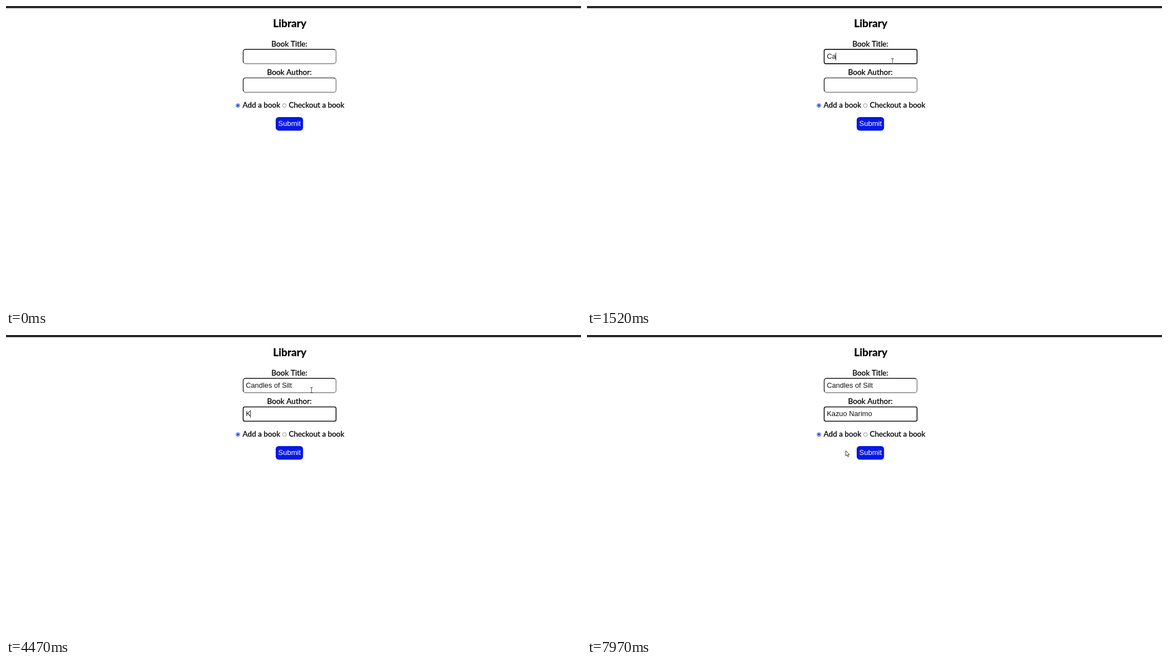
Recreate the animation shown at these times as an HTML page with a canvas. Size 1034 by 542 pixels, loop 8 s.

```html
<!DOCTYPE html>
<html lang="en">
<head>
<meta charset="utf-8">
<title>Library</title>
<style>
html, body { margin: 0; width: 100%; height: 100%; overflow: hidden; background: #fff; }
canvas { display: block; }
</style>
</head>
<body>
<canvas id="stage" width="1034" height="542"></canvas>
<script>
const ctx = document.getElementById('stage').getContext('2d');
const LOOP = 8000;
const CENTER = 509.8;
const HAND = 'Lato, sans-serif';
const SANS = '"Liberation Sans", Arial, sans-serif';
const MENU = '"Noto Sans", "Open Sans", sans-serif';

const FIELD = { x: 426.5, w: 167, h: 25.8 };
const TITLE_Y = 78.1, AUTHOR_Y = 129.5;
const TITLE = 'Candles of Silt', AUTHOR = 'Kazuo Narimo';

// [time, number of characters visible from then on]
const TITLE_KEYS = [[1370, 1], [1500, 2], [1630, 3], [1760, 4], [1890, 6], [2020, 7], [2150, 8],
  [2400, 9], [2700, 10], [2780, 11], [3310, 12], [3460, 13], [3610, 14], [3760, 15]];
const AUTHOR_KEYS = [[4470, 1], [5000, 2], [5230, 3], [5410, 4], [5590, 5], [5770, 6], [5950, 7],
  [6420, 8], [6570, 9], [6720, 10], [6890, 11], [7120, 12]];

const TITLE_HINTS = [
  'New to wool',
  '1990-1993 VOKRA TELIO OEM TOMBSTONE DASH BEZEL AC VENTS POP UP',
  '1995 WVQ N6 Sedan Rear Subframe Crossmember',
  'RADIATOR CORE SUPPORT FRONT CROSS MEMBER 52047916385 WVQ U52',
  '1990-1997 VOKRA TELIO REAR LOWER CONTROL ARM DRIVER LEFT LH NEW',
  'OEM WVQ U52 7-Format 1992-1999 Radiator Support Front Panel Used 52047'
];
const AUTHOR_HINTS = ['Kelbo Tarn', 'Kass Orvine'];

const within = (t, a, b) => t >= a && t < b;

function typed(text, keys, t) {
  let n = 0;
  for (const [time, count] of keys) if (t >= time) n = count;
  return text.slice(0, n);
}

function label(text, x, y, font, color = '#000', align = 'center') {
  ctx.font = font;
  ctx.fillStyle = color;
  ctx.textAlign = align;
  ctx.fillText(text, x, y);
}

// Label with a thin outline, for the sturdy pen-like weight.
function penLabel(text, x, y, font, align = 'center') {
  label(text, x, y, font, '#000', align);
  ctx.strokeStyle = '#000';
  ctx.lineWidth = 0.3;
  ctx.strokeText(text, x, y);
}

function rounded(x, y, w, h, r) {
  ctx.beginPath();
  ctx.roundRect(x, y, w, h, r);
}

function stroke(color, width) {
  ctx.strokeStyle = color;
  ctx.lineWidth = width;
  ctx.stroke();
}

function field(y, text, focused, caret) {
  const { x, w, h } = FIELD, r = 4.2;
  rounded(x, y, w, h, focused ? 3 : r);
  ctx.fillStyle = '#fff';
  ctx.fill();
  if (focused) {
    stroke('#101010', 1.6);
  } else {
    stroke('#6a6a6a', 1.2);
    ctx.beginPath();
    ctx.moveTo(x + 1, y + h - 2);
    ctx.lineTo(x, y + h - r);
    ctx.arcTo(x, y, x + r, y, r);
    ctx.lineTo(x + w - r, y);
    ctx.lineTo(x + w - 2, y + 1);
    stroke('#151515', 1.2);
  }
  label(text, 431.2, y + 16.9, `12.85px ${SANS}`, '#111', 'left');
  if (caret) {
    const cx = Math.floor(431.2 + ctx.measureText(text).width);
    ctx.fillStyle = '#333';
    ctx.fillRect(cx, Math.round(y + 5.4), 1, 14);
  }
}

function radio(x, checked) {
  const ring = checked ? '#1746e0' : '#858585';
  ctx.beginPath();
  ctx.arc(x, 179.2, 3.4, 0, Math.PI * 2);
  stroke(ring, 0.9);
  if (!checked) return;
  ctx.beginPath();
  ctx.arc(x, 179.2, 2.1, 0, Math.PI * 2);
  ctx.fillStyle = ring;
  ctx.fill();
}

function dropdown(y, w, hints) {
  const x = 425.3, row = 21.1;
  ctx.save();
  ctx.shadowColor = 'rgba(0,0,0,.38)';
  ctx.shadowBlur = 3;
  ctx.shadowOffsetY = 1;
  rounded(x, y, w, hints.length * row + 9, 2);
  ctx.fillStyle = '#fff';
  ctx.fill();
  ctx.restore();
  ctx.save();
  ctx.beginPath();
  ctx.rect(x, y, w - 6.8, 200);
  ctx.clip();
  hints.forEach((hint, i) =>
    label(hint, 432, y + 17.7 + i * row, `600 7.25px ${MENU}`, '#1c1c1c', 'left'));
  ctx.restore();
}

function ibeam(x, y) {
  const half = 4.5, serif = 2.5;
  ctx.beginPath();
  for (const end of [y - half, y + half]) {
    ctx.moveTo(x - serif, end);
    ctx.lineTo(x + serif, end);
  }
  ctx.moveTo(x, y - half);
  ctx.lineTo(x, y + half);
  stroke('#444', 0.9);
}

function arrow(x, y) {
  ctx.beginPath();
  ctx.moveTo(x, y);
  for (const [dx, dy] of [[0, 9.6], [2.2, 7.6], [3.8, 11], [5.2, 10.4], [3.7, 7.1], [6.6, 7]])
    ctx.lineTo(x + dx, y + dy);
  ctx.closePath();
  ctx.fillStyle = '#fff';
  ctx.fill();
  stroke('#222', 0.9);
}

function pointer(t) {
  if (t < 70) return;
  const rest = [549.5, 99.2];
  let from = [815, 364], to = rest, k = Math.min(1, Math.floor((t - 70) / 103) / 6);
  k = 1 - (1 - k) ** 2;
  if (t >= 7670) {
    from = rest;
    to = [465.3, 208.3];
    k = Math.min(1, (Math.floor((t - 7670) / 75) + 1) / 5);
    k = k * k * (3 - 2 * k);
  }
  const x = from[0] + (to[0] - from[0]) * k;
  const y = from[1] + (to[1] - from[1]) * k;
  const overField = within(x, FIELD.x, FIELD.x + FIELD.w) &&
    [TITLE_Y, AUTHOR_Y].some(top => within(y, top, top + FIELD.h));
  (overField ? ibeam : arrow)(x, y);
}

function draw(t) {
  ctx.fillStyle = '#fff';
  ctx.fillRect(0, 0, 1034, 542);
  ctx.fillStyle = '#2b292d';
  ctx.fillRect(0, 0, 1034, 4);

  penLabel('Library', CENTER + 0.4, 38, `bold 19.3px ${HAND}`);
  penLabel('Book Title:', CENTER - 0.2, 73, `13.7px ${HAND}`);
  penLabel('Book Author:', CENTER - 0.2, 124.4, `13.7px ${HAND}`);

  const onTitle = within(t, 790, 3940), onAuthor = t >= 3940;
  field(TITLE_Y, typed(TITLE, TITLE_KEYS, t), onTitle, onTitle && !within(t, 1220, 1370));
  field(AUTHOR_Y, typed(AUTHOR, AUTHOR_KEYS, t), onAuthor, onAuthor && t < 7670);

  radio(417, true);
  radio(500.6, false);
  penLabel('Add a book', 425.6, 183, `13.5px ${HAND}`, 'left');
  penLabel('Checkout a book', 508.4, 183, `13.5px ${HAND}`, 'left');

  rounded(485, 200, 49.2, 24.4, 5.5);
  ctx.fillStyle = '#0718e5';
  ctx.fill();
  label('Submit', CENTER, 216.3, `13px ${SANS}`, '#fff');

  if (within(t, 1220, 1370)) dropdown(106, 267, TITLE_HINTS);
  if (within(t, 4690, 5000)) dropdown(157.4, 170, AUTHOR_HINTS);
  pointer(t);
}

const start = performance.now();
function frame() {
  draw((performance.now() - start) % LOOP);
  requestAnimationFrame(frame);
}
frame();
</script>
</body>
</html>
```
